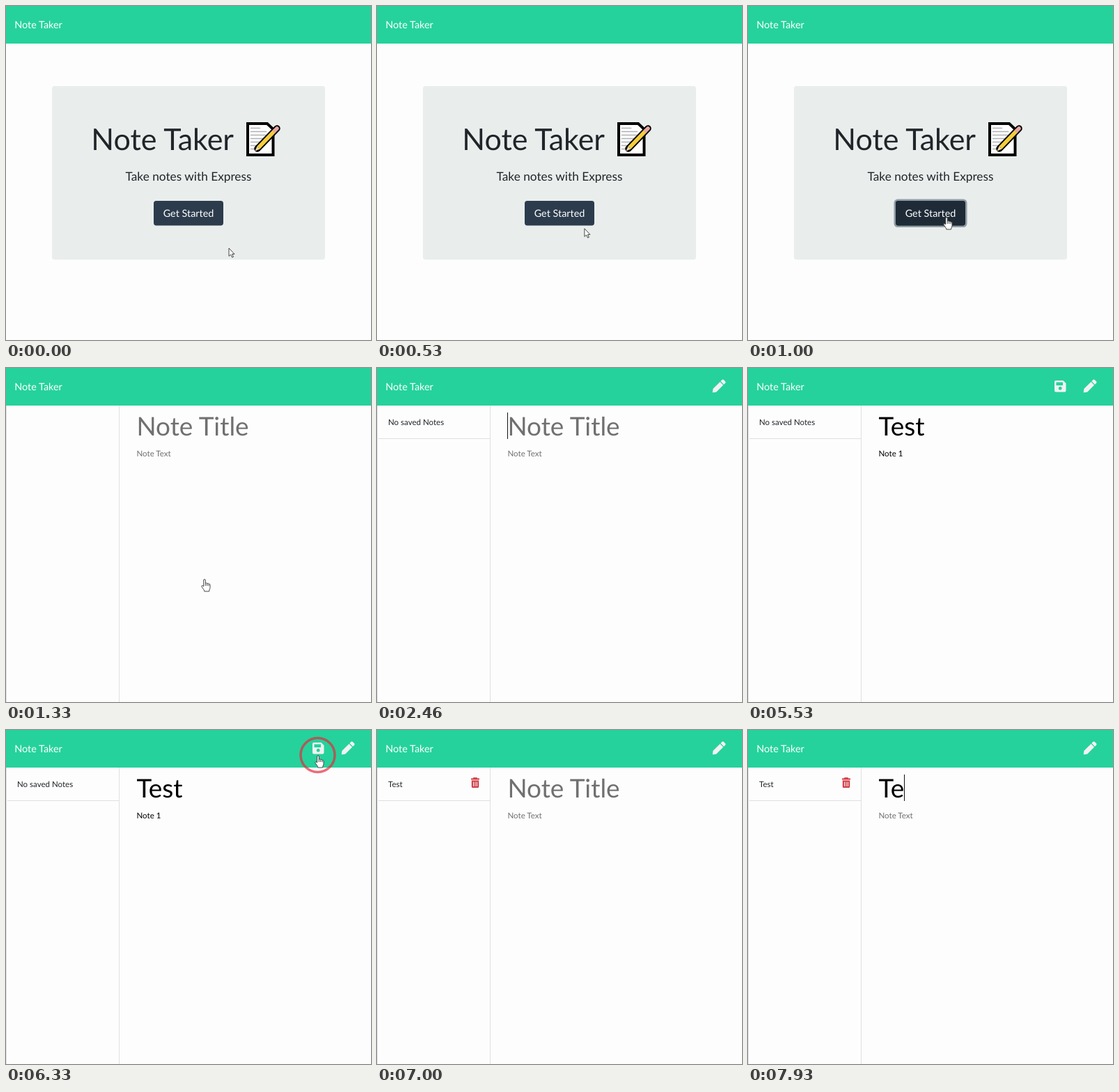
An HTML page that plays this animation: 524x480 px, repeating every 8000 ms.

```html
<!DOCTYPE html>
<html lang="en">
<head>
<meta charset="utf-8">
<title>Note Taker</title>
<style>
  html, body { margin: 0; width: 100%; height: 100%; overflow: hidden; background: #fdfdfd; }
  svg { display: block; }
  text { font-family: Lato, sans-serif; font-size: 11.52px; fill: #212529; white-space: pre; text-rendering: geometricPrecision; }
  .brand { font-size: 14.4px; fill: #fff; }
  .heading { font-size: 43px; }
  .lead { font-size: 17.28px; }
  .title { font-size: 36.9px; }
  .title, .body { fill: #000; }
  .hint { fill: #707070; }
  .mid { text-anchor: middle; }
  .line { fill: #dedfe0; }
  .icon { fill: #f1f2f2; }
</style>
</head>
<body>
<svg width="524" height="480" viewBox="0 0 524 480">
  <rect width="524" height="480" fill="#fdfdfd"/>
  <rect width="524" height="54" fill="#25d29b"/>
  <text class="brand" x="12.3" y="32.3">Note Taker</text>

  <g data-on="0-1330">
    <rect x="66" y="115" width="392" height="249.5" rx="3.5" fill="#e9eeed"/>
    <text class="heading" x="122.3" y="207.3">Note Taker</text>
    <g stroke-linejoin="round" stroke-linecap="round">
      <path d="M347 169H375L383.500 177V214H347Z" fill="#fff" stroke="#000" stroke-width="4" stroke-linejoin="miter"/>
      <path d="M351.500 175.500h13M351.500 180.500h22M351.500 185.500h22M351.500 190.500h18M351.500 195.500h14M351.500 200.500h10M351.500 205.500h6" stroke="#aeb0b2" stroke-width="1.700"/>
      <path d="M361 205L389 176" stroke="#000" stroke-width="9.500"/>
      <path d="M362.500 203.500L386 179" stroke="#f5ce3e" stroke-width="5.500" stroke-linecap="butt"/>
      <path d="M386 179L389 176" stroke="#e8a5a0" stroke-width="5.500"/>
      <path d="M357.500 208.500L360.500 201.500L364.500 205.500Z" fill="#f0d9a5"/>
    </g>
    <text class="lead mid" x="262" y="251.3">Take notes with Express</text>
    <rect data-on="930-1330" x="209.500" y="277.500" width="105" height="40.500" rx="5.500" fill="#919ca5"/>
    <rect x="212" y="280" width="100" height="35.500" rx="3.700" fill="#2c3c4d"/>
    <rect id="hover" x="212" y="280" width="100" height="35.500" rx="3.700" fill="#1e2b37"/>
    <text class="brand mid" x="262" y="303.2">Get Started</text>
  </g>

  <g data-on="1330-8000">
    <rect class="line" y="54" width="1" height="426"/>
    <rect class="line" x="162" y="54" width="1" height="426"/>
    <rect data-on="1400-8000" class="line" x="2" y="101" width="160" height="1"/>
    <text data-on="1400-6600" x="16" y="82">No saved Notes</text>
    <g data-on="6600-8000">
      <text x="16" y="82">Test</text>
      <path d="M138.500 68.300h5l.8 1.200h2.700v2h-12v-2h2.700zM135.800 72.500h10.400v9a1.500 1.500 0 0 1-1.500 1.500h-7.400a1.500 1.500 0 0 1-1.500-1.500z" fill="#d33c45"/>
      <path d="M138.500 74.500v6.500M141 74.500v6.500M143.500 74.500v6.500" stroke="#fdfdfd"/>
    </g>
    <text id="title" class="title" x="187.5" y="97.2"></text>
    <text id="body" class="body" x="187.5" y="127"></text>
    <rect id="caret" width="1" fill="#111"/>
    <path data-on="4330-6530" class="icon" fill-rule="evenodd" d="M442 18h10.500l4 4v10.500a2 2 0 0 1-2 2h-12.500a2 2 0 0 1-2-2v-12.500a2 2 0 0 1 2-2zM442.500 20.400v4.600h9.500v-4.600zM448.200 26.800a2.400 2.400 0 1 0 .01 0z"/>
    <path data-on="1400-8000" class="icon" transform="translate(481.7 16.5) scale(.0367)" d="M497.9 142.1l-46.100 46.100c-4.700 4.700-12.300 4.700-17 0l-111-111c-4.700-4.700-4.700-12.300 0-17l46.100-46.100c18.700-18.700 49.100-18.700 67.900 0l60.100 60.100c18.800 18.700 18.800 49.100 0 67.900zM284.200 99.800L21.600 362.400.4 483.900c-2.900 16.400 11.400 30.600 27.800 27.800l121.500-21.300 262.600-262.600c4.700-4.700 4.700-12.300 0-17l-111-111c-4.800-4.700-12.400-4.700-17.100 0z"/>
  </g>

  <circle id="ring" cx="447.500" cy="36" fill="none" stroke="#e6283c" stroke-width="3.500"/>
  <g id="pointer" stroke="#333" stroke-width=".9" stroke-linejoin="round" fill="#fff">
    <path id="arrow" d="M0 0V11.500L2.700 9.200L4.700 13.300L6.500 12.400L4.600 8.500H8Z"/>
    <path id="hand" d="M-1.300 10.500V1.500C-1.300-.3 1.300-.3 1.300 1.500V6C2 5 3.500 5.200 3.700 6.300C4.500 5.500 5.800 5.900 6 7C6.900 6.400 8 7 8 8.200V12C8 14 6.800 14.500 6.600 17.500H-.2C-.4 15-2.500 13.500-4 10.800C-4.800 9.200-3 8.300-1.300 10.500ZM1.300 6V9.500M3.700 6.500V9.500M6 7.200V9.700"/>
  </g>
</svg>
<script>
const LOOP = 8000, BLINK = 530;
const el = id => document.getElementById(id);
const show = (node, on) => node.setAttribute('visibility', on ? 'inherit' : 'hidden');
const set = (node, attrs) => { for (const k in attrs) node.setAttribute(k, attrs[k]); };
const clamp = x => Math.min(1, Math.max(0, x));
const ramp = (t, a, b) => clamp((t - a) / (b - a));
const ease = u => u * u * (3 - 2 * u);

const timed = [...document.querySelectorAll('[data-on]')].map(node => {
  const [from, to] = node.dataset.on.split('-').map(Number);
  return { node, from, to };
});

// [time, text] after each key press
const fields = {
  title: { hint: 'Note Title', top: 64, height: 38,
    keys: [[0, ''], [3060, 'T'], [3200, 'Te'], [3330, 'Tes'], [3400, 'Test'], [6530, ''], [7860, 'T'], [7930, 'Te']] },
  body: { hint: 'Note Text', top: 116, height: 14,
    keys: [[0, ''], [4260, 'N'], [4330, 'No'], [4600, 'Not'], [4660, 'Note'], [4800, 'Note\u00a0'], [5000, 'Note\u00a01'], [6530, '']] }
};
const focus = [[0, ''], [2330, 'title'], [3600, 'body'], [6260, ''], [7400, 'title']];
const last = (list, t) => list.filter(step => step[0] <= t).pop();

// [start, end, from, to]
const moves = [
  [60, 860, [320, 348], [285, 303.5]],
  [5530, 6200, [300, 86], [448, 36.5]],
  [6600, 7000, [448, 36.5], [300, 80]]
];

function drawFields(t) {
  for (const id in fields) {
    const text = last(fields[id].keys, t)[1];
    const node = el(id);
    node.textContent = text || fields[id].hint;
    node.classList.toggle('hint', !text);
  }
  const [since, id] = last(focus, t);
  const field = fields[id];
  if (!field) return show(el('caret'), false);
  const [typed, text] = last(field.keys, t);
  const on = (t - Math.max(since, typed)) % (2 * BLINK) < BLINK;
  show(el('caret'), on);
  const width = text ? el(id).getComputedTextLength() : 0;
  set(el('caret'), { x: Math.round(187 + width), y: field.top, height: field.height });
}

function drawPointer(t) {
  const [a, b, from, to] = last(moves, t) || moves[0];
  const p = ease(ramp(t, a, b));
  const [x, y] = from.map((v, i) => v + (to[i] - v) * p);
  // the pointer is not seen above the text fields
  const seen = t < 1860 || (t >= 5530 && y < 54);
  const hand = (t > 590 && t < 1860) || (x > 439 && t < 6600);
  set(el('pointer'), { transform: `translate(${x} ${y})` });
  show(el('pointer'), seen);
  show(el('arrow'), !hand);
  show(el('hand'), hand);
}

function draw(t) {
  for (const { node, from, to } of timed) show(node, t >= from && t < to);
  el('hover').setAttribute('opacity', ramp(t, 590, 740));
  drawFields(t);
  drawPointer(t);
  show(el('ring'), t >= 6200 && t < 6530);
  set(el('ring'), { r: 12 + 12.500 * ramp(t, 6200, 6330), opacity: .68 * (1 - ramp(t, 6460, 6530)) });
}

const start = performance.now();
function tick() {
  draw((performance.now() - start) % LOOP);
  requestAnimationFrame(tick);
}
tick();
</script>
</body>
</html>
```
